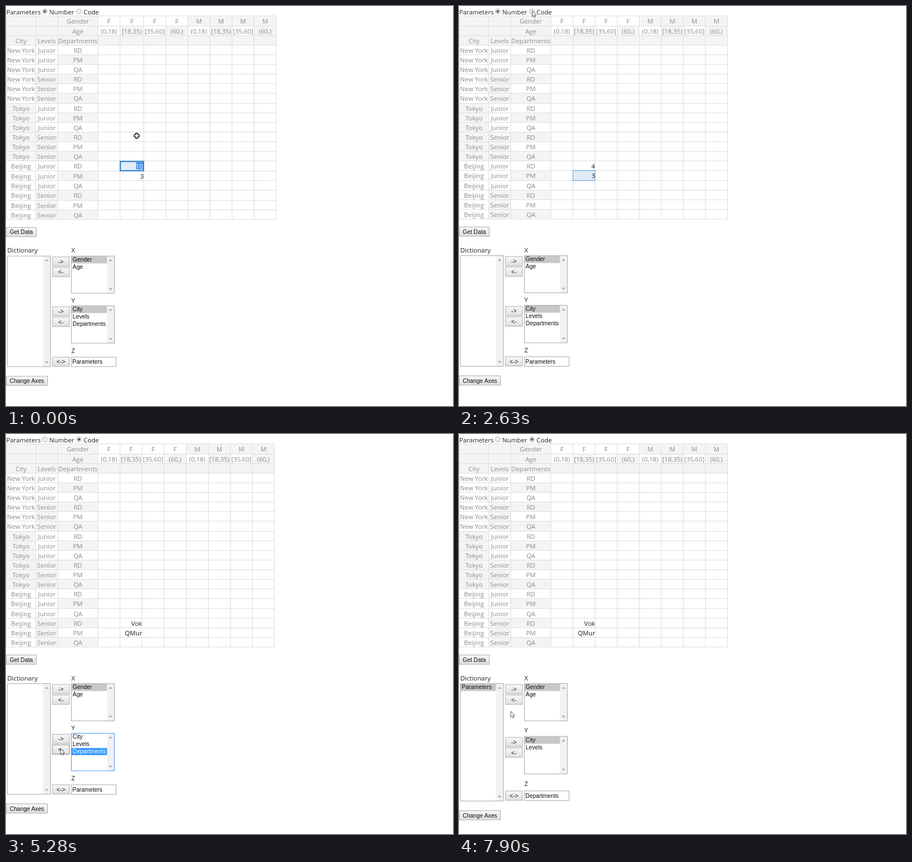
These frames come from a looping animation (790 by 709 pixels, 8 s). An HTML page:

```html
<!DOCTYPE html>
<html lang="en">
<head>
<meta charset="utf-8">
<title>Pivot table</title>
<style>
html, body { margin: 0; width: 100%; height: 100%; overflow: hidden; background: #fff; }
svg { display: block; width: 790px; height: 709px; }
.ui { font: 11.3px "Open Sans", "Noto Sans", sans-serif; fill: #222; }
.head { fill: #8c8c8c; }
.form { font: 10.26px "Liberation Sans", Arial, sans-serif; fill: #111; }
.mid { text-anchor: middle; }
.end { text-anchor: end; }
.inv { fill: #fff; }
</style>
</head>
<body>
<svg id="stage" viewBox="0 0 790 709" xmlns="http://www.w3.org/2000/svg"></svg>
<script>
const LOOP = 8000;
const stage = document.getElementById('stage');

// time, x, y, shape (1 = cell cross, 0 = arrow)
const moves = [
  [0, 231, 230, 1],
  [1840, 233, 218, 1], [2040, 214, 140, 1], [2240, 164, 58, 1], [2430, 133, 11, 0], [2630, 129, 8, 0],
  [3460, 130, 60, 1], [3650, 130, 290, 1], [3840, 127, 470, 0],
  [4060, 129, 505, 0], [4270, 134, 545, 0], [4480, 135, 559, 0],
  [4870, 122, 560, 0], [5070, 102, 558, 0], [5280, 96, 557, 0],
  [5880, 96, 559, 0], [6080, 95, 562, 0], [6290, 94, 565, 0], [6500, 93, 567, 0],
  [6680, 94, 605, 0], [6880, 95, 636, 0], [7100, 96, 641, 0],
  [7700, 94, 560, 0], [7900, 91, 491, 0]
];
// moments at which the page itself changes
const COMMIT = 1200, CODE = 3040, PICK = 4670, MOVE = 5670, SWAP = 7310;
const changes = [190, 620, COMMIT, CODE, PICK, MOVE, SWAP];
const steps = [...new Set([...moves.map(m => m[0]), ...changes])].sort((a, b) => a - b);

const rect = (x, y, w, h, fill, stroke = 'none', sw = 1) =>
  `<rect x="${x}" y="${y}" width="${w}" height="${h}" fill="${fill}" stroke="${stroke}" stroke-width="${sw}"/>`;
const text = (x, y, s, cls) =>
  `<text x="${x}" y="${y}" class="${cls}">${s.replace(/</g, '&lt;').replace(/>/g, '&gt;')}</text>`;
const path = (d, attrs) => `<path d="${d}" ${attrs}/>`;

const SHADE = '#f3f5f5', LINE = '#dedede';
const cities = ['New York', 'Tokyo', 'Beijing'];
const levels = ['Junior', 'Senior'];
const departments = ['RD', 'PM', 'QA'];
const ages = ['(0,18)', '[18,35)', '[35,60]', '(60,)'];

function table(t) {
  const editing = t < COMMIT;
  const left = c => c < 3 ? [0.5, 52.5, 91.5][c]
    : Math.round(162 + 39.05 * (c - 3) + (editing && c > 4 ? 2.8 : 0)) + .5;
  const rowY = r => 17.4 + 17.13 * r + (editing && r > 15 ? .75 : 0);
  const top = r => Math.round(rowY(r)) + .5;
  let fills = '', words = '', grid = '', extra = '';

  const fill = (r, c, color) => {
    fills += rect(left(c), top(r), left(c + 1) - left(c), top(r + 1) - top(r), color);
  };
  const head = (r, c, s, shaded) => {
    if (shaded) fill(r, c, SHADE);
    if (s) words += text((left(c) + left(c + 1)) / 2, rowY(r) + 14, s, 'ui head mid');
  };
  const value = (r, s) => { words += text(left(5), rowY(r) + 14, s, 'ui end'); };

  ['Gender', 'Age', 'Departments'].forEach((s, r) => {
    head(r, 0, r === 2 ? 'City' : '', true);
    head(r, 1, r === 2 ? 'Levels' : '', true);
    head(r, 2, s, true);
  });
  for (let i = 0; i < 8; i++) {
    head(0, i + 3, i < 4 ? 'F' : 'M', i > 3);
    head(1, i + 3, ages[i % 4], i % 2);
    head(2, i + 3, '', true);
  }
  for (let i = 0; i < 18; i++) {
    const city = Math.floor(i / 6), level = Math.floor(i / 3) % 2;
    head(i + 3, 0, cities[city], city % 2);
    head(i + 3, 1, levels[level], level);
    head(i + 3, 2, departments[i % 3], i % 2);
  }
  for (let c = 0; c < 12; c++) grid += `M${left(c)} ${top(0)}V${top(21)}`;
  for (let r = 0; r < 22; r++) grid += `M${left(0)} ${top(r)}H${left(11)}`;

  if (editing) {
    value(16, '3');
    extra += rect(202, 275.5, 41, 16.5, '#e2ebf6', '#3284ce', 2.2);
    if (t < 190) {
      extra += rect(230, 277, 12, 12.5, '#4a90ea') + text(242, 287.5, '10', 'ui end inv');
    } else {
      extra += text(241, 287.5, '4', 'ui end');
      if (t < 620) extra += rect(241, 277, 1, 12, '#222');
    }
  } else if (t < CODE) {
    value(15, '4');
    extra = rect(left(4), top(16), left(5) - left(4), top(17) - top(16), '#e1ecf8', '#5b9bdc');
    extra += text(left(5), rowY(16) + 14, '3', 'ui end');
  } else {
    if (t < 4060) [15, 16, 18, 19].forEach(r => fill(r, 4, '#edf6ff'));
    value(18, 'Vok');
    value(19, 'QMur');
  }
  return fills + path(grid, `stroke="${LINE}" fill="none"`) + words + extra;
}

function button(x, y, w, label, hover) {
  return rect(x, y, w, 16.5, 'url(#face)', hover ? '#868686' : '#b0b0b0') +
    text(x + w / 2, y + 12, label, 'form mid');
}

function list(x, y, w, h, items, picked, active) {
  const bar = x + w - 13, mid = bar + 6.3;
  let out = rect(x, y, w, h, '#fff') + rect(bar, y, 13, h, '#f1f1f1');
  out += path(`M${mid - 3} ${y + 9}l3 -3.5 3 3.5zM${mid - 3} ${y + h - 9}l3 3.5 3 -3.5z`, 'fill="#a3a3a3"');
  items.forEach((s, i) => {
    const iy = y + .5 + i * 12.8;
    if (i === picked) out += rect(x + .5, iy, w - 13.5, 12.6, active ? '#3399ff' : '#c8c8c8');
    out += text(x + 2.3, iy + 9.4, s, 'form' + (i === picked && active ? ' inv' : ''));
  });
  return out + rect(x, y, w, h, 'none', active ? '#4d90fe' : '#ababab');
}

function radio(x, on) {
  return `<circle cx="${x}" cy="9.6" r="4.3" fill="#f0f0f0" stroke="#a8a8a8"/>` +
    (on ? `<circle cx="${x}" cy="9.6" r="2.4" fill="#5a5a5a"/>` : '');
}

function form(t) {
  const dy = t < COMMIT ? .7 : 0;
  const moved = t >= MOVE, swapped = t >= SWAP, picking = t >= PICK && !moved;
  const shift = n => dy + (moved ? n : 0);
  const yTop = 530.5 + shift(5.5), zTop = 621.7 + shift(11);
  const yItems = moved ? ['City', 'Levels'] : ['City', 'Levels', 'Departments'];
  const dict = moved ? [swapped ? 'Parameters' : 'Departments'] : [];

  return button(.5, 391.7 + dy, 53, 'Get Data') +
    text(2.3, 436.6 + dy, 'Dictionary', 'ui') +
    text(115.5, 436.6 + dy, 'X', 'ui') +
    list(2.5, 442.5 + dy, 76, 196 + (moved ? 12 : 0), dict, 0, false) +
    button(82, 444 + dy, 30, '->') +
    button(82, 462.7 + dy, 30, '<-') +
    list(115.5, 442.5 + dy, 76, 66, ['Gender', 'Age'], 0, false) +
    text(115.5, 525 + shift(4.2), 'Y', 'ui') +
    button(82, yTop + 1.8, 30, '->') +
    button(82, yTop + 20.6, 30, '<-', t >= 5070 && t < 6680) +
    list(115.5, yTop, 76, 66.5, yItems, picking ? 2 : 0, picking) +
    text(115.5, 614.3 + shift(10), 'Z', 'ui') +
    button(82, zTop, 30, '<->', t >= 6880 && t < 7700) +
    rect(115.5, zTop, 79, 16.8, '#fff', '#ababab') +
    text(117.3, zTop + 11.8, swapped ? 'Departments' : 'Parameters', 'form') +
    button(.5, 655.5 + shift(12), 73, 'Change Axes');
}

function header(t) {
  const code = t >= CODE;
  return text(.5, 14.5, 'Parameters', 'ui') + radio(68.5, !code) +
    text(76.5, 14.5, 'Number', 'ui') + radio(129, code) + text(137, 14.5, 'Code', 'ui');
}

function pointer(t) {
  const [, x, y, cross] = moves.filter(m => m[0] <= t).pop();
  const d = cross ? 'M-1.8 -4.5H1.8V-1.8H4.5V1.8H1.8V4.5H-1.8V1.8H-4.5V-1.8H-1.8Z'
    : 'M.5 .5V11L2.8 8.8 4.4 12.4 6 11.7 4.4 8.2H7.6Z';
  return path(d, `transform="translate(${x} ${y})" fill="#fff" stroke="${cross ? '#111' : '#333'}" stroke-width="${cross ? 1.3 : .8}"`);
}

const defs = '<defs><linearGradient id="face" x1="0" y1="0" x2="0" y2="1">' +
  '<stop offset="0" stop-color="#f8f8f8"/><stop offset="1" stop-color="#dfdfdf"/></linearGradient></defs>';

let shown = -1;
function tick() {
  const t = performance.now() % LOOP;
  const step = steps.filter(s => s <= t).pop();
  if (step !== shown) {
    shown = step;
    stage.innerHTML = defs + header(step) + table(step) + form(step) + pointer(step);
  }
  requestAnimationFrame(tick);
}
tick();
</script>
</body>
</html>
```
